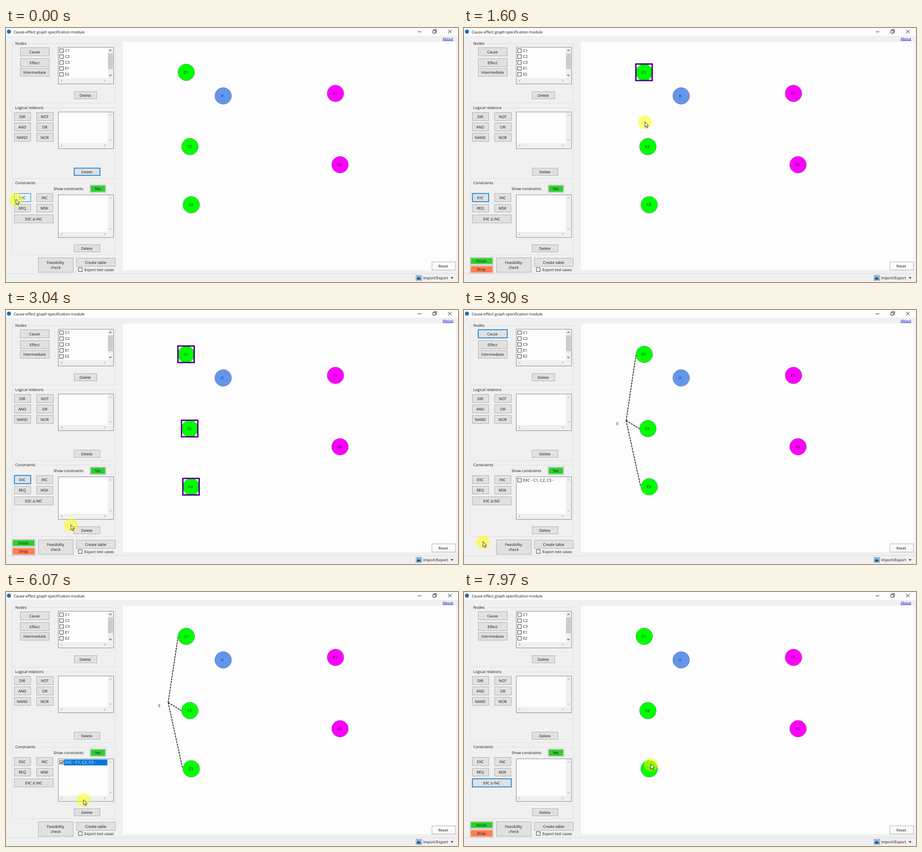
An HTML page that plays this animation: 998 px wide and 561 px high, repeating every 8000 ms.

```html
<!DOCTYPE html>
<html lang="en">
<head>
<meta charset="utf-8">
<title>Graph specification</title>
<style>
  html, body { margin: 0; width: 100%; height: 100%; overflow: hidden; background: #f0f0f0; }
  svg { display: block; width: 998px; height: 561px; }
  text { font: 8.3px "Open Sans", "Noto Sans", sans-serif; fill: #111; text-rendering: geometricPrecision; }
</style>
</head>
<body>
<svg id="stage" viewBox="0 0 998 561"></svg>
<script>
const LOOP = 8000;
const BLUE = '#0078d7';
const stage = document.getElementById('stage');

function add(tag, attrs, parent = stage) {
  const el = document.createElementNS('http://www.w3.org/2000/svg', tag);
  for (const key in attrs) el.setAttribute(key, attrs[key]);
  parent.append(el);
  return el;
}
const group = () => add('g', {});
const path = (d, stroke, width = 1, parent) =>
  add('path', { d, stroke, 'stroke-width': width, fill: 'none' }, parent);

function box(x1, y1, x2, y2, fill, stroke, parent) {
  return add('rect', {
    x: x1 + .5, y: y1 + .5, width: x2 - x1 - 1, height: y2 - y1 - 1,
    fill, stroke: stroke || fill
  }, parent);
}

function label(str, x, y, anchor = 'start', parent) {
  const el = add('text', { x, y: y + 3, 'text-anchor': anchor }, parent);
  el.textContent = str;
  return el;
}

const buttons = {};
function button(id, x1, y1, x2, y2, str = id) {
  const rect = box(x1, y1, x2, y2, '#e1e1e1', '#adadad');
  const lines = str.split('|');
  lines.forEach((line, i) =>
    label(line, (x1 + x2) / 2 - .5, (y1 + y2) / 2 + (i - (lines.length - 1) / 2) * 11, 'middle'));
  buttons[id] = { rect, x1, y1, x2, y2 };
}

function colorButton(str, x1, y1, x2, y2, fill, parent) {
  box(x1, y1, x2, y2, '#f4f4f4', '#b4b4b4', parent);
  box(x1 + 2, y1 + 2, x2 - 2, y2 - 2, fill, fill, parent);
  label(str, (x1 + x2) / 2 - .5, (y1 + y2) / 2, 'middle', parent);
}

function frame(title, y1, y2, width) {
  box(13, y1, 242, y2, 'none', '#dfdfdf');
  box(18, y1 - 3, 22 + width, y1 + 4, '#f0f0f0');
  label(title, 20.5, y1);
}

function checkbox(x, y, parent) {
  box(x - 4.5, y - 4.5, x + 4.5, y + 4.5, '#fff', '#333', parent);
}

function chevron(x, y, dx, dy, color) {
  const a = 2.4, b = 1.3;
  path(dx ? `M${x - b * dx} ${y - a}L${x + b * dx} ${y}L${x - b * dx} ${y + a}`
          : `M${x - a} ${y - b * dy}L${x} ${y + b * dy}L${x + a} ${y - b * dy}`, color, 1.2);
}

function listBox(y1, y2, active) {
  const color = active ? '#444' : '#b5b5b5';
  box(115, y1, 238, y2, '#fdfdfd', '#828790');
  box(225, y1 + 1, 237, y2 - 1, '#f0f0f0');
  box(116, y2 - 13, 237, y2 - 1, '#f0f0f0');
  if (active) box(225, y1 + 14, 236, y1 + 49, '#cdcdcd');
  chevron(230.5, y1 + 7.5, 0, -1, color);
  chevron(230.5, y2 - 19.5, 0, 1, color);
  chevron(123, y2 - 7.5, -1, 0, '#b5b5b5');
  chevron(218, y2 - 7.5, 1, 0, '#b5b5b5');
}

// Window chrome
box(0, 0, 998, 561, '#f0f0f0');
box(0, 0, 998, 17, '#fdfdfd');
add('circle', { cx: 6.5, cy: 8, r: 4.5, fill: '#1b6fb3' });
label('Cause-effect graph specification module', 17, 8.5).style.fontSize = '8.4px';
path('M909 8.5h8M942.5 5.5h6v6h-6zM944.5 5.5v-2h6v6h-2M976 4l8 8M984 4l-8 8', '#222');
const about = label('About', 964, 23.5);
about.style.fill = '#0000e0';
about.style.textDecoration = 'underline';
box(258, 30, 994, 535, '#fdfdfd');
path('M0 542.5H998', '#dcdcdc');

// Import/Export menu
box(905, 546, 918, 558, '#fff', '#56738c');
box(907, 548, 916, 556, '#4aa3df');
add('path', { d: 'M907 556v-3l3-2 2 2 2-1 2 2v2z', fill: '#24506f' });
label('Import/Export', 921, 552);
add('path', { d: 'M982 550.5h6l-3 3.5z', fill: '#222' });

// Side panel
frame('Nodes', 34, 166, 27);
button('Cause', 31, 43, 96, 62);
button('Effect', 31, 67, 96, 86);
button('Intermediate', 31, 89, 96, 107);
listBox(42, 124, true);
['C1', 'C2', 'C3', 'E1', 'E2'].forEach((name, i) => {
  checkbox(122.5, 50 + i * 13.1);
  label(name, 130.5, 49.5 + i * 13.1);
});
button('deleteNode', 150, 140, 201, 157, 'Delete');

frame('Logical relations', 176, 333, 64);
[['DIR', 'NOT'], ['AND', 'OR'], ['NAND', 'NOR']].forEach(([a, b], i) => {
  const y = 185.5 + i * 23.3;
  button(a, 18, Math.round(y), 55, Math.round(y) + 19);
  button(b, 67, Math.round(y), 105, Math.round(y) + 19);
});
listBox(185, 267);
button('deleteRelation', 150, 309, 208, 326, 'Delete');

frame('Constraints', 342, 501, 46);
label('Show constraints', 105, 355);
colorButton('Yes', 185, 346, 221, 364, '#32cd32');
button('EXC', 18, 365, 55, 384);
button('INC', 67, 365, 104, 384);
button('REQ', 18, 389, 55, 407);
button('MSK', 67, 389, 104, 407);
button('EXC Δ INC', 18, 412, 105, 431);
listBox(368, 463);
button('deleteConstraint', 150, 478, 208, 495, 'Delete');
button('Feasibility', 71, 507, 149, 540, 'Feasibility|check');
button('Create table', 155, 508, 242, 527);
checkbox(164, 533.5);
label('Export test cases', 173, 533.5);
box(940, 516, 993, 535, '#fdf9f9', '#adadad');
label('Reset', 965.5, 525.5, 'middle');

const editing = group();
colorButton('Finish', 13, 506, 65, 523, '#32cd32', editing);
colorButton('Drop', 13, 524, 65, 542, '#ff7f50', editing);

// Constraint row and its drawing
const constraint = group();
const rowFill = box(128, 370, 224, 383, BLUE, BLUE, constraint);
checkbox(122.5, 376, constraint);
const tick = path('M120 376l2 2 3.5-4', '#111', 1.2, constraint);
const rowText = label('EXC - C1, C2, C3 -', 130.5, 375.5, 'start', constraint);
rowText.style.fontSize = '8.7px';
const links = path('M358 244L380 98M358 244L387 262M358 244L390 390', '#000', 1.5, constraint);
links.setAttribute('stroke-dasharray', '4.5 1.7');
label('E', 336.5, 250.5, 'start', constraint);

// Graph nodes
function node(name, x, y, fill, textX = x - 1) {
  add('circle', { cx: x, cy: y, r: 18.4, fill, stroke: '#555', 'stroke-width': .8, 'stroke-dasharray': '2 1' });
  label(name, textX, y - .5, 'middle');
  return add('rect', { x: x - 18.5, y: y - 18.5, width: 36, height: 36.5, fill: 'none', stroke: '#4b0082', 'stroke-width': 3 });
}
const marks = [
  node('C1', 398, 98, '#0f0'),
  node('C2', 406, 262, '#0f0'),
  node('C3', 409, 390.5, '#0f0'),
  node('I1', 479.5, 150, '#6495ed', 477.5),
  node('E1', 727.5, 144.5, '#f0f'),
  node('E2', 737.5, 302, '#f0f')
];

const pointer = group();
add('circle', { r: 15, fill: '#ff0', 'fill-opacity': .53 }, pointer);
add('path', {
  d: 'M0 -1V10.6L2.6 8.2 4.3 12.3 6.2 11.5 4.5 7.5H8Z',
  fill: '#fff', stroke: '#111', 'stroke-width': .9
}, pointer);

// Pointer stops: time, x, y. A repeated position is a rest.
const route = [
  [0, 22, 379], [60, 24, 378], [400, 24, 378], [870, 310, 149],
  [1150, 394, 99], [1350, 394, 99], [1750, 402, 258], [1950, 402, 258],
  [2370, 404, 377.5], [2600, 404, 379], [2650, 404, 379],
  [3250, 42, 512.5], [4050, 42, 512.5], [4670, 186.5, 417.5],
  [5050, 123, 376], [5600, 123, 376], [6070, 171, 459.5],
  [6250, 176, 485], [6500, 176, 485], [7000, 60, 421], [7350, 60, 421],
  [7900, 412.5, 381], [8000, 412.5, 381]
];
const focusSteps = [
  [0, 'deleteRelation'], [200, 'EXC'], [3400, 'Cause'], [5150, ''],
  [6400, 'deleteConstraint'], [7150, 'EXC Δ INC']
];
const markTimes = [1250, 1850, 2500];

function slope(i, k) {
  const prev = route[i - 1], here = route[i], next = route[i + 1];
  if (!prev || !next || prev[k] === here[k] || next[k] === here[k]) return 0;
  if ((here[k] - prev[k]) * (next[k] - here[k]) < 0) return 0;
  return (next[k] - prev[k]) / (next[0] - prev[0]);
}

function along(t, k) {
  const i = Math.max(0, route.findIndex(stop => stop[0] > t) - 1);
  const a = route[i], b = route[i + 1], span = b[0] - a[0];
  const u = (t - a[0]) / span, v = 1 - u;
  return v * v * (1 + 2 * u) * a[k] + u * u * (3 - 2 * u) * b[k]
    + span * u * v * (v * slope(i, k) - u * slope(i + 1, k));
}

const show = (el, on) => el.setAttribute('visibility', on ? 'inherit' : 'hidden');
const within = (t, from, to) => t >= from && t < to;

function draw(now) {
  const t = now % LOOP;
  const x = along(t, 1), y = along(t, 2);
  pointer.setAttribute('transform', `translate(${x} ${y})`);

  const focused = focusSteps.filter(step => step[0] <= t).pop()[1];
  for (const id in buttons) {
    const b = buttons[id];
    const hover = x >= b.x1 && x < b.x2 && y >= b.y1 && y < b.y2;
    const focus = id === focused && !hover;
    b.rect.setAttribute('fill', hover ? '#e5f1fb' : '#e1e1e1');
    b.rect.setAttribute('stroke', hover || focus ? BLUE : '#adadad');
    b.rect.setAttribute('stroke-width', focus ? 1.7 : 1);
  }

  show(editing, within(t, 200, 3400) || t >= 7150);
  marks.forEach((mark, i) => show(mark, within(t, markTimes[i], 3400)));
  show(constraint, within(t, 3400, 6400));
  show(rowFill, t >= 5150);
  show(tick, t >= 5400);
  if (!within(t, 3400, 6400)) {
    show(rowFill, false);
    show(tick, false);
  }
  rowText.style.fill = t >= 5150 ? '#fff' : '#111';
}

function tickFrame() {
  draw(performance.now());
  requestAnimationFrame(tickFrame);
}
tickFrame();
</script>
</body>
</html>
```
